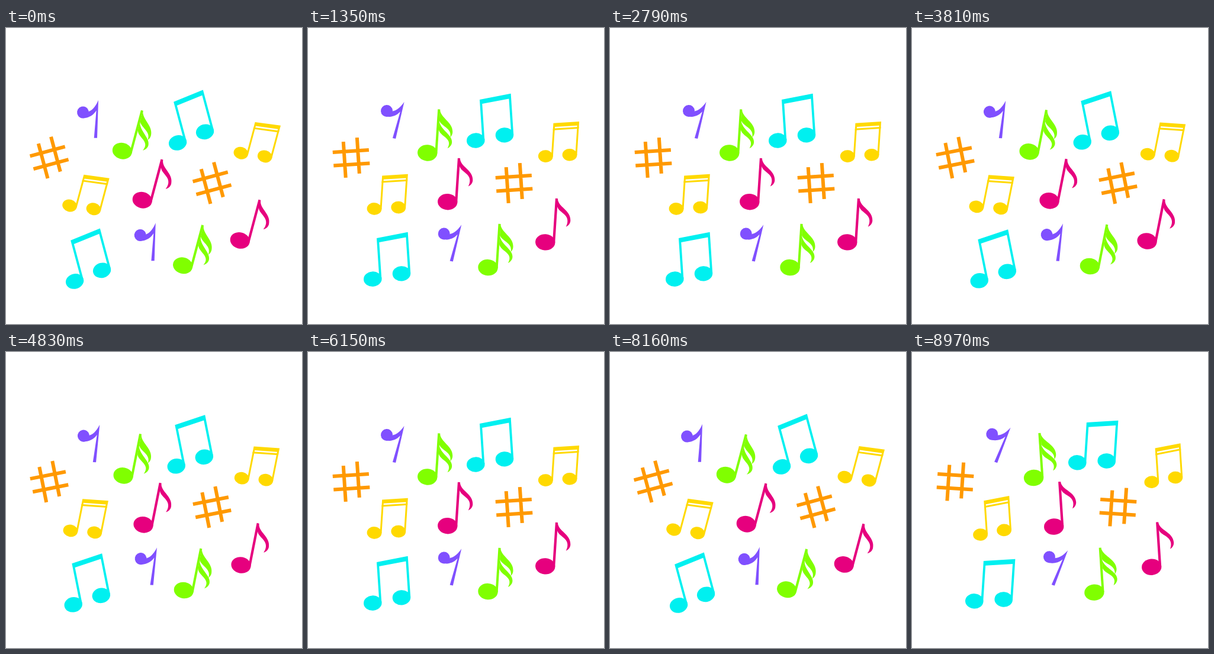
These frames come from a looping animation (500x500 px, 9 s). An HTML page:

```html
<!DOCTYPE html>
<html lang="en">
<head>
<meta charset="utf-8">
<title>Dancing notes</title>
<style>
  html, body { margin: 0; width: 100%; height: 100%; overflow: hidden; background: #fff; }
  svg { display: block; width: 100%; height: 100%; --turn: -15deg; }
  .cw { transform: rotate(var(--turn)); }
  .ccw { transform: rotate(calc(-1 * var(--turn))); }
</style>
</head>
<body>
<svg id="stage" viewBox="0 0 500 500">
  <defs>
    <g id="sharp" fill="none" stroke="#ff9900" stroke-width="6">
      <path d="M-11.5 -27.7V33.2M12 -33.2V27.7M-30.6 -11H30.6M-30.6 11.5H30.6"/>
    </g>
    <g id="rest" fill="#8050ff">
      <circle cx="-10.2" cy="-17.2" r="10"/>
      <path d="M-10 -7.3C-3 -6 6 -8 12.5 -14.5L-3.3 29.3L1.8 30.7L20.3 -30.5C15 -23.5 8 -17 -.3 -16Z"/>
    </g>
    <g id="eighth" fill="#e6007e">
      <ellipse cx="-10.3" cy="30.4" rx="16.7" ry="13.7"/>
      <path d="M2 -44.6H6C7 -30 29 -27 29.8 -9C30 -4 27 0 23 2C26 -5 26 -12 20 -17.5C14 -23 8 -25 6.2 -31V30.4H2Z"/>
    </g>
    <g id="sixteenth" fill="#80ff00">
      <ellipse cx="-11.9" cy="29.8" rx="16.7" ry="13.7"/>
      <path d="M.8 -45H4.8V29.8H.8Z"/>
      <path d="M4.6 -45C5.5 -31 28 -25 28.3 -8C28.4 -4 27 -1.5 25 1C25.5 -7 23 -10.5 16 -15.5C10 -19.5 6 -22 4.6 -26Z"/>
      <path d="M4.6 -26C6 -11 28 -4 28.3 9C28.4 14 25.5 17.5 21.5 20C25 12 24 7.5 17 2C11 -2.5 6 -5 4.6 -11Z"/>
    </g>
    <g id="pair" fill="#00f0f0">
      <ellipse cx="-25" cy="31" rx="15.3" ry="12.7"/>
      <ellipse cx="24.2" cy="25" rx="15.3" ry="12.7"/>
      <path d="M-13.8 -37.6L39.4 -44.3V25H35.6V-35.8L-10 -30.1V31H-13.8Z"/>
    </g>
    <g id="double" fill="#ffd900">
      <ellipse cx="-23.3" cy="27" rx="12.4" ry="10.3"/>
      <ellipse cx="17.2" cy="22" rx="12.4" ry="10.3"/>
      <path d="M-13.8 -29.7L29.6 -35.2V22H26.6V-28.3L-10.8 -23.6V27H-13.8Z"/>
      <path d="M-13.8 -20.7L29.6 -26.2V-23.2L-13.8 -17.7Z"/>
    </g>
  </defs>

  <g transform="translate(73 219)"><use href="#sharp" class="cw"/></g>
  <g transform="translate(348 262)"><use href="#sharp" class="cw"/></g>
  <g transform="translate(144.3 156.5)"><use href="#rest" class="cw"/></g>
  <g transform="translate(241 364)"><use href="#rest" class="cw"/></g>
  <g transform="translate(306.2 157.5)"><use href="#pair" class="cw"/></g>
  <g transform="translate(132.2 391.5)"><use href="#pair" class="cw"/></g>
  <g transform="translate(248 264)"><use href="#eighth" class="ccw"/></g>
  <g transform="translate(413 332.2)"><use href="#eighth" class="ccw"/></g>
  <g transform="translate(215.5 182)"><use href="#sixteenth" class="ccw"/></g>
  <g transform="translate(317.8 375.6)"><use href="#sixteenth" class="ccw"/></g>
  <g transform="translate(426.3 191.2)"><use href="#double" class="ccw"/></g>
  <g transform="translate(137 280)"><use href="#double" class="ccw"/></g>
</svg>
<script>
  const LOOP = 9000, TICK = 30, HALF = 8, SWING = 15;
  const stage = document.getElementById('stage');
  const start = performance.now();

  // Stepped linear swing; the loop cuts off part of the last swing.
  function draw() {
    const time = (performance.now() - start) % LOOP;
    const step = Math.floor(time / TICK) % (2 * HALF);
    const turn = SWING - 2 * SWING * Math.abs(step - HALF) / HALF;
    stage.style.setProperty('--turn', turn + 'deg');
    requestAnimationFrame(draw);
  }
  draw();
</script>
</body>
</html>
```
